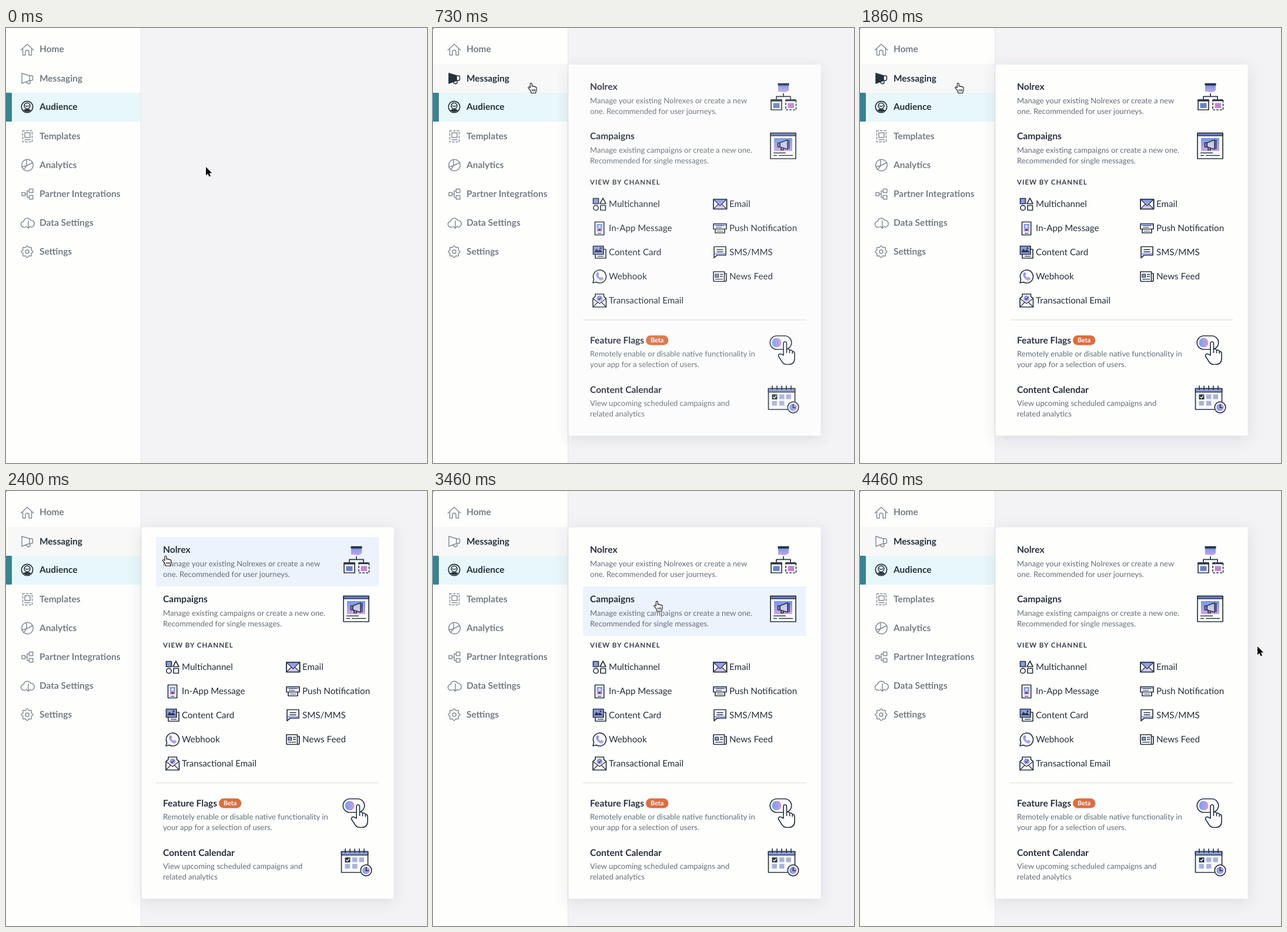
An HTML page for the animation above (4530 ms loop, 716 by 739 pixels).

```html
<!DOCTYPE html>
<html lang="en">
<head>
<meta charset="utf-8">
<title>Navigation menu</title>
<style>
  html, body { margin: 0; width: 100%; height: 100%; overflow: hidden; background: #f3f3f6; }
  svg { display: block; width: 716px; height: 739px; font-family: Lato, sans-serif; text-rendering: geometricPrecision; }
  .bold { font-weight: 700; font-size: 15.45px; }
  .title { font-size: 15.6px; fill: #29323e; }
  .text { font-size: 13.05px; fill: #656e7a; }
  .channel { font-size: 15.15px; fill: #252d38; }
  .heading { font-weight: 700; font-size: 11.5px; letter-spacing: 1px; fill: #343d49; }
  .nav { fill: #757d85; stroke: #858d95; }
  .nav.on { fill: #26313d; stroke: #26313d; }
  .nav text { stroke: none; }
  .nav g { fill: none; stroke-width: 1.5; stroke-linejoin: round; stroke-linecap: round; }
  .nav .solid { fill: #26313d; }
  .icons { fill: none; stroke: #2b3646; stroke-width: 1.7; stroke-linejoin: round; }
  .icons .g { fill: url(#tint); stroke: none; }
  .icons .w { fill: #fdfdfe; }
  .icons .b { fill: #8b9bdc; }
  .icons .d { fill: #2b3646; }
</style>
</head>
<body>
<svg viewBox="0 0 716 739">
  <defs>
    <linearGradient id="tint" x2="0" y2="1">
      <stop offset="0" stop-color="#7299e8"/>
      <stop offset="1" stop-color="#cfa3ea"/>
    </linearGradient>
    <linearGradient id="side">
      <stop offset=".2" stop-color="#7da3ee"/>
      <stop offset="1" stop-color="#d797e2"/>
    </linearGradient>
    <filter id="shadow" x="-20%" y="-20%" width="140%" height="140%">
      <feDropShadow dx="0" dy="5" stdDeviation="11" flood-color="#404860" flood-opacity=".15"/>
    </filter>
  </defs>

  <rect width="716" height="739" fill="#f3f3f6"/>
  <rect width="229" height="739" fill="#fefefd"/>
  <rect x="229" width="1" height="739" fill="#e6e6e9"/>
  <rect id="rowHover" y="61" width="229" height="49" fill="#f8f8f9"/>
  <rect y="110" width="229" height="49" fill="#e8f7f9"/>
  <path d="M0 110H8.5q1.5 0 1.5 1.5V157.5q0 1.5-1.5 1.5H0Z" fill="#388294"/>
  <g id="sidebar"></g>

  <g id="panel">
    <rect x="230.5" y="62" width="429" height="630.5" rx="3" fill="#fefefd" filter="url(#shadow)"/>
    <rect id="cardHover" x="255" width="379.5" height="84" rx="2" fill="#ecf3fd"/>
    <path d="M255 495.7H634.5" stroke="#e8e9ec" stroke-width="2"/>
    <g id="labels"></g>
    <rect x="362" y="522.3" width="38.5" height="16.4" rx="8.2" fill="#dc6e40"/>
    <text x="381.2" y="534.3" text-anchor="middle" font-size="10.8" font-weight="700" fill="#fff">Beta</text>

    <g class="icons">
      <!-- journey tree -->
      <path class="g" d="M587 97H605V106Q601 110 596 109T587 108Z"/>
      <path class="d" d="M587.3 94.5H604.7V97H587.3Z"/>
      <path d="M596 111V116M584 121.5V116.3H608V121.5"/>
      <path class="w" d="M575 122H593V139H575Z"/>
      <path class="d" d="M575 122H593V124H575Z"/>
      <path d="M578.5 127.5H589.5V136H578.5Z" fill="#6a80cc" stroke="none"/>
      <path class="w" d="M600 122H617.5V139H600Z" stroke-dasharray="4 2"/>
      <path d="M600 122.8H617.5" stroke-width="3"/>
      <path d="M603.5 127.5H614V136H603.5Z" fill="#c583d6" stroke="none"/>
      <!-- browser page -->
      <path class="w" d="M574 178.5H617V222H574Z"/>
      <path d="M574 178.5H617V183H574Z" fill="#6c80c8"/>
      <path class="g" d="M580 187H611V209H580Z"/>
      <path class="w" d="M590 195 603 190V206L590 202Z" fill-opacity=".45"/>
      <path d="M586.5 195H590V202H586.5ZM592 203V207H596V204M605.5 190V206"/>
      <path d="M579 212.3H600M579 216.5H585M588 216.5H612" stroke-width="1.4"/>
      <!-- shapes -->
      <path class="b" d="M272.5 289.5H281.5V298.5H272.5Z"/>
      <path d="M289 289 294 298.5H284ZM285 301.5H293.5V309.5H285Z"/>
      <circle cx="277" cy="305.5" r="4.2"/>
      <!-- envelope -->
      <path class="w" d="M477 291H499.5V307.5H477Z"/>
      <path class="g" d="M477 291H499.5L488.2 302Z"/>
      <path class="g" d="M478 307 485 299.5 488.2 302 491.5 299.5 498.5 307Z" opacity=".55"/>
      <path d="M477 291H499.5V307.5H477Z"/>
      <path d="M477 291 488.2 302 499.5 291M477 307.5 485 299.5M499.5 307.5 491.5 299.5" stroke-width="1.1"/>
      <!-- phone screen -->
      <path class="w" d="M275.5 329.5H290.7V351.5H275.5Z"/>
      <path class="g" d="M278.5 333H288V346H278.5Z"/>
      <circle class="w" cx="283.2" cy="337.3" r="2" stroke="none"/>
      <path class="d" d="M281 342H285.5V344H281Z" stroke="none"/>
      <path d="M280 348.7H286.5" stroke-width="1.2"/>
      <!-- push banner -->
      <path class="w" d="M480 341V348H496V341M477 332.5H499V341.5H477Z"/>
      <path class="g" d="M478 333.5H498V336H478Z"/>
      <path d="M481 335.8H495M481 338.7H491M483 345H493" stroke-width="1.1"/>
      <!-- stacked cards -->
      <path class="w" d="M276 376H294V391H276Z"/>
      <path d="M280 387.8H290" stroke-width="1.3"/>
      <path class="b" d="M272.5 370.5H290V384.5H272.5Z"/>
      <path class="d" d="M274 381 278 375 281 378.5 284 376 288.5 381Z" stroke="none"/>
      <circle class="d" cx="285" cy="374" r="1.6" stroke="none"/>
      <!-- speech bubble -->
      <path class="w" d="M478 371.5H498V386H483L478 390.5Z"/>
      <path class="g" d="M479 382.5H497V385H479Z"/>
      <path d="M482.5 376.5H493.5M482.5 380.3H493.5" stroke-width="1.4"/>
      <!-- call bubble -->
      <path class="w" d="M272 433 273.6 427A11 11 0 1 1 278 431.7Z"/>
      <path d="M279 416Q277 418 278 421.5 280.5 427.5 286 428.5 289 428.5 290 425.5L286.5 423 284.5 424.5Q281.5 422.8 280.8 420L282.3 418.5 281 415.5Z" fill="url(#tint)" stroke="#8a8fd8" stroke-width=".6"/>
      <!-- newspaper -->
      <path class="w" d="M495.5 417H499V428Q499 430.5 497 430.5H479Q477 430.5 477 428.5V414H495.5V430"/>
      <path class="b" d="M480 418H485.5V423.5H480Z" stroke-width="1.2"/>
      <path d="M488 418.5H493M488 422H493M480 426.7H493" stroke-width="1.3"/>
      <!-- opened letter -->
      <path class="w" d="M272 459.5 276 456V452H290.5V456L294.5 459.5V474H272Z"/>
      <circle class="g" cx="283.3" cy="459.5" r="5"/>
      <path d="M281 459.5 282.8 461.5 286 457.5" stroke-width="1.2"/>
      <path d="M272 459.5 283.2 468 294.5 459.5M272 474 280 466M294.5 474 286.5 466" stroke-width="1.4"/>
      <!-- toggle and hand -->
      <rect class="w" x="573.2" y="523" width="36.5" height="23" rx="11.5"/>
      <circle cx="584.5" cy="534.5" r="8" fill="url(#side)" stroke="none"/>
      <path class="w" d="M596 556V536Q596 533 598.7 533T601.4 536V546Q605 544 606.5 547.5 610 546 611.3 549.5 615 549 615 553V561Q615 571.5 605 571.5H601Q596 571.5 593 566L587.5 557.5Q587 553.5 591 553.5Z"/>
      <path d="M601.4 546V552M606.5 547.5V552.5M611.3 549.5V553.5"/>
      <!-- calendar and clock -->
      <path class="w" d="M570.5 612.5H615.5V648H570.5Z"/>
      <path class="b" d="M570.5 612.5H615.5V618.5H570.5Z"/>
      <path d="M577 607.5V615M585 607.5V615M593 607.5V615M601 607.5V615M609 607.5V615"/>
      <path class="d" d="M576.5 622.5H585.5V631H576.5Z" stroke="none"/>
      <path d="M578.5 626.7 580.5 628.8 584 624.5" stroke="#fff" stroke-width="1.3"/>
      <path d="M589 622.5H597.5V630.5H589ZM600.5 622.5H609V630.5H600.5ZM576.5 633.5H585V641.5H576.5ZM589 633.5H597.5V641.5H589Z" fill="#a9b1de" stroke="none"/>
      <circle class="w" cx="612.5" cy="644.5" r="9.3"/>
      <circle cx="612.5" cy="644.5" r="6.3" fill="url(#side)" stroke="none"/>
      <path d="M612.5 639V645H617"/>
    </g>
  </g>

  <rect id="corner" width="1" height="1"/>
  <g id="pointer" stroke-linejoin="round">
    <path id="arrow" d="M0 0V14.6L3.3 11.5 5.5 16.6 8 15.5 5.8 10.5H10.3Z" fill="#080808" stroke="#fff" stroke-width="1.2" paint-order="stroke"/>
    <path id="hand" d="M-2 11.5-5 8.6C-5.8 7-3.8 6-2.5 7.2L-1.7 8V1.5C-1.7-.4 1.2-.4 1.3 1.5V5.8C2 4.6 4 4.9 4.1 6.2 5 5.2 6.6 5.7 6.7 6.9 7.6 6 9.2 6.7 9.1 8.2V12C9 14 7.7 14.6 7.6 17H0C-.2 14.5-1 13.2-2 11.5ZM1.8 10.5V14M4.2 10.5V14M6.4 10.5V14" fill="#fff" stroke="#111" stroke-width="1.1"/>
  </g>
</svg>

<script>
const LOOP = 4530;
const $ = id => document.getElementById(id);
const show = (el, on) => el.setAttribute('visibility', on ? 'inherit' : 'hidden');
const label = (cls, x, y, str) => `<text class="${cls}" x="${x}" y="${y}">${str}</text>`;

function gear(cx, cy) {
  const points = Array.from({ length: 97 }, (_, i) => {
    const a = i / 96 * 2 * Math.PI, r = 8.8 + 1.1 * Math.cos(8 * a);
    return `${(cx + r * Math.cos(a)).toFixed(2)} ${(cy + r * Math.sin(a)).toFixed(2)}`;
  });
  return `<path d="M${points.join('L')}Z"/><circle cx="${cx}" cy="${cy}" r="3"/>`;
}

const navItems = [
  ['Home', 41.3, '<path d="M25.5 37.5 36 27.5 46.7 37.5M28.5 35.5V46H33V40.5a3 3 0 0 1 6 0V46H43.5V35.5"/>'],
  ['Messaging', 91, '<path id="horn" d="M27 77 40 81V89.3L27 94Z"/><path d="M40 81H43Q45.5 81 45.5 83.5V86.5Q45.5 89.3 43 89.3H40M34.5 91.5 36 94Q38.5 96 41 93.5V89.3"/>'],
  ['Audience', 139, '<circle cx="36" cy="134" r="9.7" stroke-width="1.7"/><circle cx="36" cy="132.2" r="5" stroke-width="1.5"/><path d="M33 132Q36 134.5 39 132" stroke-width="1.4"/><path class="solid" d="M30 139.8 33.2 138Q36 139.3 38.8 138L42 139.8Q36 144.5 30 139.8Z" stroke-width="1"/>'],
  ['Templates', 189, '<path d="M28.5 174.5H44.5V193.5H28.5Z" stroke-dasharray="3.2 3"/><path d="M32 178H41V186H32ZM32 189.7H41"/>'],
  ['Analytics', 238, '<circle cx="36.5" cy="233" r="9.8"/><path d="M35 223.5V234L45.5 228.5M35 234 27 236M35 234 30 240.5"/>'],
  ['Partner Integrations', 287, '<path d="M27 279.5H32.5V285H27ZM39.5 273.5H45.8V279.8H39.5ZM39.5 284.5H45.8V290.8H39.5ZM32.5 282.2H36M39.5 276.7H36V287.7H39.5"/>'],
  ['Data Settings', 336, '<path d="M33 338.5H31A5 5 0 0 1 30 328.5 6.5 6.5 0 0 1 42 326.5 6 6 0 0 1 42.5 338.5M38 327.5V340M34.5 336.7 38 340.2 41.5 336.7"/>'],
  ['Settings', 385, gear(36, 380)]
];
$('sidebar').innerHTML = navItems.map(([name, y, icon]) =>
  `<g class="nav${name === 'Audience' ? ' on' : ''}" id="nav${name.split(' ')[0]}"><g>${icon}</g>${label('bold', 57, y, name)}</g>`).join('');

const cards = [
  ['Nolrex', 105, 'Manage your existing Nolrexes or create a new', 'one. Recommended for user journeys.'],
  ['Campaigns', 189, 'Manage existing campaigns or create a new one.', 'Recommended for single messages.'],
  ['Feature Flags', 535.5, 'Remotely enable or disable native functionality in', 'your app for a selection of users.'],
  ['Content Calendar', 619.5, 'View upcoming scheduled campaigns and', 'related analytics']
];
const channels = [
  [299, ['Multichannel', 'In-App Message', 'Content Card', 'Webhook', 'Transactional Email']],
  [504, ['Email', 'Push Notification', 'SMS/MMS', 'News Feed']]
];
$('labels').innerHTML =
  cards.map(([name, y, ...lines]) => label('bold title', 267, y, name) +
    lines.map((line, i) => label('text', 267, y + 22.7 + 18 * i, line)).join('')).join('') +
  label('heading', 267, 266, 'VIEW BY CHANNEL') +
  channels.map(([x, names]) => names.map((name, i) => label('channel', x, 304.3 + 41 * i, name)).join('')).join('');

// Pointer stops: time, x, y
const stops = [
  [0, 340, 236], [30, 340, 236], [490, 167, 93.5], [2060, 167, 93.5], [2640, 333, 120],
  [2950, 333, 120], [3380, 381, 187.3], [3750, 381, 187.3], [4400, 676, 264], [LOOP, 676, 264]
];
function pointerAt(t) {
  const i = stops.findIndex(s => s[0] > t);
  const [t0, x0, y0] = stops[i - 1], [t1, x1, y1] = stops[i];
  const u = (t - t0) / (t1 - t0), e = u * u * (3 - 2 * u);
  return [x0 + (x1 - x0) * e, y0 + (y1 - y0) * e];
}

function panelOpacity(t) {
  if (t < 630) return 0;
  return t < 830 ? Math.min(0.9, (t - 600) / 140) : 1;
}

function draw(t) {
  const [x, y] = pointerAt(t);
  const opacity = panelOpacity(t);
  const onRow = x < 229 && y > 61 && y < 110;
  const active = onRow || opacity > 0;
  const card = opacity && x > 255 && x < 634 ? Math.floor((y - 78) / 84) : -1;

  $('pointer').setAttribute('transform', `translate(${x.toFixed(2)} ${y.toFixed(2)})`);
  const isHand = x < 229 || (opacity > 0 && x < 659);
  show($('hand'), isHand);
  show($('arrow'), !isHand);
  show($('corner'), t >= 30);

  show($('rowHover'), active);
  $('navMessaging').classList.toggle('on', onRow);
  $('navMessaging').querySelector('text').style.fill = active ? '#26313d' : '';
  $('horn').classList.toggle('solid', onRow);

  $('panel').setAttribute('opacity', opacity);
  show($('cardHover'), card === 0 || card === 1);
  $('cardHover').setAttribute('y', 78 + 84 * Math.max(card, 0));
}

const start = performance.now();
function tick() {
  draw((performance.now() - start) % LOOP);
  requestAnimationFrame(tick);
}
tick();
</script>
</body>
</html>
```
